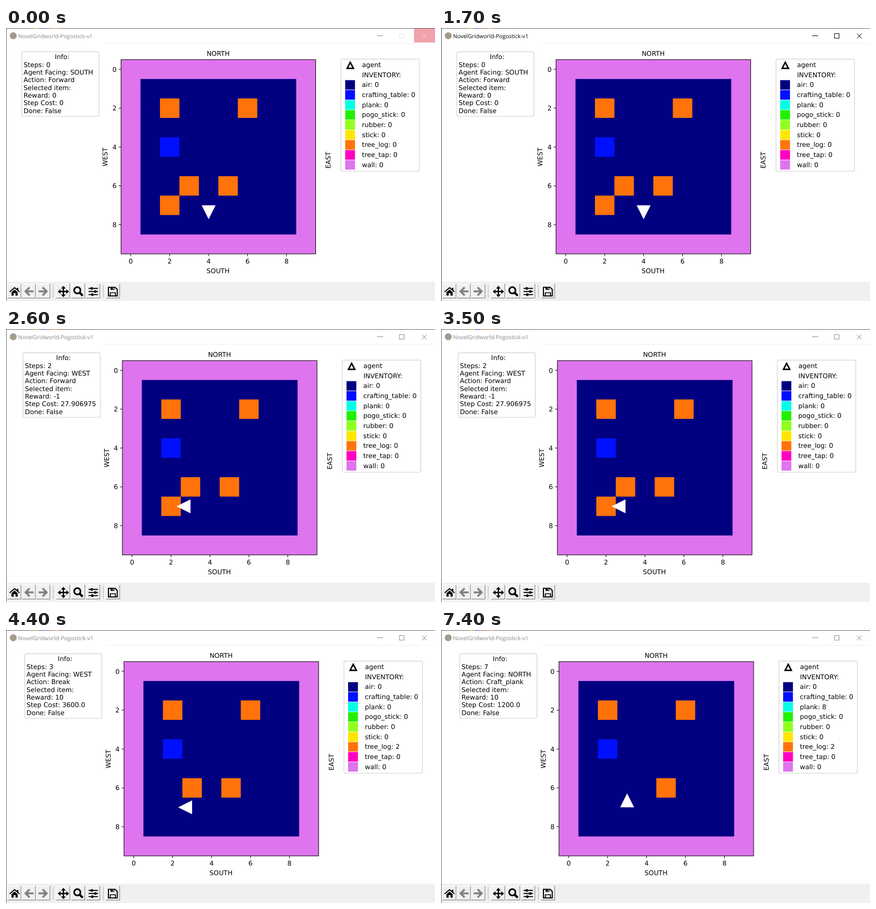
An HTML page for the animation above (8 s loop, 800x510 px).

```html
<!DOCTYPE html>
<html lang="en">
<head>
<meta charset="utf-8">
<title>NovelGridworld</title>
<style>
  html, body { margin: 0; width: 100%; height: 100%; overflow: hidden; background: #fff; }
  svg { display: block; }
  text { font: 12.2px "DejaVu Sans", sans-serif; text-rendering: geometricPrecision; white-space: pre; }
  #caption { font: 10.43px "Open Sans", sans-serif; }
  .mid { text-anchor: middle; }
  .end { text-anchor: end; }
  .line { fill: none; stroke: #000; }
  .frame { fill: #fff; stroke: #d2d2d2; stroke-width: 1.2; }
  .off { stroke: #808080; }
</style>
</head>
<body>
<svg width="800" height="510" viewBox="0 0 800 510">
  <rect width="800" height="510" fill="#fff"/>

  <g id="plot">
    <rect class="frame" x="29.5" y="44.3" width="143.8" height="120.7" rx="3"/>
    <text class="mid" x="104.7" y="58">Info:</text>
    <g id="info"></g>
    <rect x="214.5" y="59" width="363" height="363" fill="#de74ee"/>
    <rect x="250.8" y="95.3" width="290.4" height="290.4" fill="#000080"/>
    <g id="cells"></g>
    <path id="agent" d="M-13 0H13L0 26Z" fill="#fff"/>
    <rect class="line" x="214.5" y="59" width="363" height="363"/>
    <g id="ticks"></g>
    <text class="mid" x="395.7" y="51.8">NORTH</text>
    <text class="mid" x="395.5" y="457.6">SOUTH</text>
    <text class="mid" transform="translate(189.4 241) rotate(-90)">WEST</text>
    <text class="mid" transform="translate(605.2 247) rotate(-90)">EAST</text>
    <rect class="frame" x="624.7" y="58.2" width="146.3" height="209.3" rx="3"/>
    <path class="line" d="M642 64.2L647.8 75.3H636.2Z" stroke-width="2.7"/>
    <text x="664" y="73">agent</text>
    <text x="664" y="91.7">INVENTORY:</text>
    <g id="legend"></g>
  </g>

  <path d="M186 28.5H800" stroke="#eee"/>
  <circle cx="13.5" cy="14.5" r="6.5" fill="#a39a8c"/>
  <text id="caption" x="22.6" y="18.6">NovelGridworld-Pogostick-v1</text>
  <rect id="hover" x="761" y="1" width="39" height="26" fill="#f1a1a9"/>
  <g id="controls" fill="none">
    <path d="M692 14.5H703.5"/>
    <rect id="maximize" x="733.8" y="10.5" width="8.5" height="8.5"/>
    <path id="close" d="M775.5 10.5L784.5 19.5M784.5 10.5L775.5 19.5"/>
  </g>

  <rect y="474" width="800" height="36" fill="#f0f0f0"/>
  <g id="buttons"></g>
  <path d="M88 480V504M181.5 480V504" stroke="#b4b4b4"/>
  <path d="M10.3 493.5L16 488.5L21.7 493.5V500H17.8V495.3H14.2V500H10.3ZM20.3 485.5H23V491L20.3 488.5Z"/>
  <path class="line" d="M6.8 493L16 485L25.2 493" stroke-width="2"/>
  <path id="back" class="line off" d="M51.5 492H37M44 484.5L36.5 492L44 499.5" stroke-width="3.6"/>
  <use href="#back" transform="translate(112.3 0) scale(-1 1)"/>
  <path class="line" d="M99 492.3H115M107 484.3V500.3" stroke-width="2.4"/>
  <g id="arrows"></g>
  <g class="line">
    <circle cx="133" cy="490" r="5.9" stroke-width="3"/>
    <path d="M137.5 494.5L143 500" stroke-width="4"/>
    <path d="M154 486.5H171.5M154 492.3H171.5M154 498.1H171.5" stroke-width="1.9"/>
    <path d="M160 484.2V488.8M166.5 490V494.6M161 495.8V500.4" stroke-width="3.8"/>
    <path d="M191 484.5H203.5L207.5 488.5V500.5H191Z" stroke-width="2"/>
    <path d="M194.5 500V494.5H204V500" stroke-width="1.7"/>
    <path d="M195 487H202" stroke-width="4.5"/>
  </g>
  <path d="M200 485.3V488.2" stroke="#f0f0f0" stroke-width="1.5"/>

  <path d="M0 .5H800" stroke="#666"/>
  <path d="M52 .5H61M86 .5H97" stroke="#c8783c"/>
  <path d="M63 .5H73" stroke="#3c46a0"/>
  <path id="edge" d="M.5 0V510"/>
</svg>

<script>
const LOOP = 8000, CELL = 36.3, LEFT = 214.5, TOP = 59;
const FOCUS_ON = 1700, FOCUS_OFF = 2000;
const $ = id => document.getElementById(id);
const cx = col => LEFT + (col + .5) * CELL;
const cy = row => TOP + (row + .5) * CELL;

const items = [
  ['air', '#000080'], ['crafting_table', '#0010ff'], ['plank', '#00ffe6'],
  ['pogo_stick', '#22f000'], ['rubber', '#90ff1c'], ['stick', '#ffe600'],
  ['tree_log', '#ff730a'], ['tree_tap', '#ff00c0'], ['wall', '#de74ee']
];
const trees = [[2, 2], [6, 2], [5, 6], [3, 6], [2, 7]];
const turn = { SOUTH: 0, WEST: 90, NORTH: 180 };

// The number of steps is the index; trees are felled from the end of the list.
const steps = [
  { at: 0, dx: 0, col: 4, face: 'SOUTH', action: 'Forward', reward: 0, cost: '0', trees: 5, log: 0, plank: 0 },
  { at: 2000, face: 'WEST', action: 'Right', reward: -1, cost: '24.0' },
  { at: 2500, dx: 2.5, col: 3, action: 'Forward', cost: '27.906975' },
  { at: 3600, dx: 5.5, action: 'Break', reward: 10, cost: '3600.0', trees: 4, log: 2 },
  { at: 4800, face: 'NORTH', action: 'Right', reward: -1, cost: '24.0' },
  { at: 5800, action: 'Break', reward: 10, cost: '3600.0', trees: 3, log: 4 },
  { at: 6700, action: 'Craft_plank', cost: '1200.0', log: 3, plank: 4 },
  { at: 7400, log: 2, plank: 8 }
];
for (let i = 1; i < steps.length; i++) steps[i] = { ...steps[i - 1], ...steps[i] };

const square = (col, row, fill) =>
  `<rect x="${cx(col) - CELL / 2}" y="${cy(row) - CELL / 2}" width="${CELL}" height="${CELL}" fill="${fill}"/>`;

$('ticks').innerHTML = [0, 2, 4, 6, 8].map(n => `
  <path class="line" d="M${cx(n)} 422v4.3M${LEFT} ${cy(n)}h-4.3"/>
  <text class="mid" x="${cx(n)}" y="440.2">${n}</text>
  <text class="end" x="206.2" y="${cy(n) + 4.5}">${n}</text>`).join('');

$('legend').innerHTML = items.map(([name, fill], i) => {
  const y = 106.3 + i * 18.67;
  return `<rect x="632.5" y="${y - 8.9}" width="18.3" height="17.8" fill="${fill}"/>
    <text id="${name}" x="663.8" y="${y + 4.1}">${name}: 0</text>`;
}).join('');

$('info').innerHTML = Array.from({ length: 7 }, (_, i) =>
  `<text x="32.8" y="${72.7 + i * 14.3}"></text>`).join('');

$('buttons').innerHTML = [2.5, 29.5, 56.5, 93.5, 121.5, 149.5, 186.5].map(x => `
  <path class="line" d="M${x} 505V478.5H${x + 25}" style="stroke:#fff"/>
  <path class="line" d="M${x} 504.5H${x + 25.5}V478" style="stroke:#777"/>`).join('');

$('arrows').innerHTML = [0, 90, 180, 270].map(a =>
  `<path d="M96.5 492.3l5-4.4v8.8z" transform="rotate(${a} 107 492.3)"/>`).join('');

function showStep(n) {
  const s = steps[n];
  const lines = [`Steps: ${n}`, `Agent Facing: ${s.face}`, `Action: ${s.action}`, 'Selected item:',
    `Reward: ${s.reward}`, `Step Cost: ${s.cost}`, 'Done: False'];
  lines.forEach((line, i) => $('info').children[i].textContent = line);
  $('plot').setAttribute('transform', `translate(${s.dx} 0)`);
  $('cells').innerHTML = square(2, 4, items[1][1]) +
    trees.slice(0, s.trees).map(([c, r]) => square(c, r, items[6][1])).join('');
  $('agent').setAttribute('transform', `translate(${cx(s.col)} ${cy(7)}) rotate(${turn[s.face]})`);
  $('plank').textContent = `plank: ${s.plank}`;
  $('tree_log').textContent = `tree_log: ${s.log}`;
}

function showWindow(t) {
  const focused = t >= FOCUS_ON && t < FOCUS_OFF;
  const glow = Math.max(0, 1 - Math.floor(t / 100) / 3);
  $('caption').style.fill = focused ? '#000' : '#858585';
  $('caption').style.fontSize = t < FOCUS_ON ? '10.3px' : '10.43px';
  $('controls').style.stroke = focused ? '#000' : '#8c8c8c';
  $('edge').style.stroke = focused ? '#444' : '#666';
  $('hover').style.opacity = glow;
  $('maximize').style.opacity = 1 - .75 * glow;
  $('close').style.stroke = glow > .5 ? '#f8d0d4' : '';
}

let shown = -1;
function draw() {
  const t = performance.now() % LOOP;
  const n = steps.filter(s => s.at <= t).length - 1;
  if (n !== shown) showStep(shown = n);
  showWindow(t);
  requestAnimationFrame(draw);
}
draw();
</script>
</body>
</html>
```
